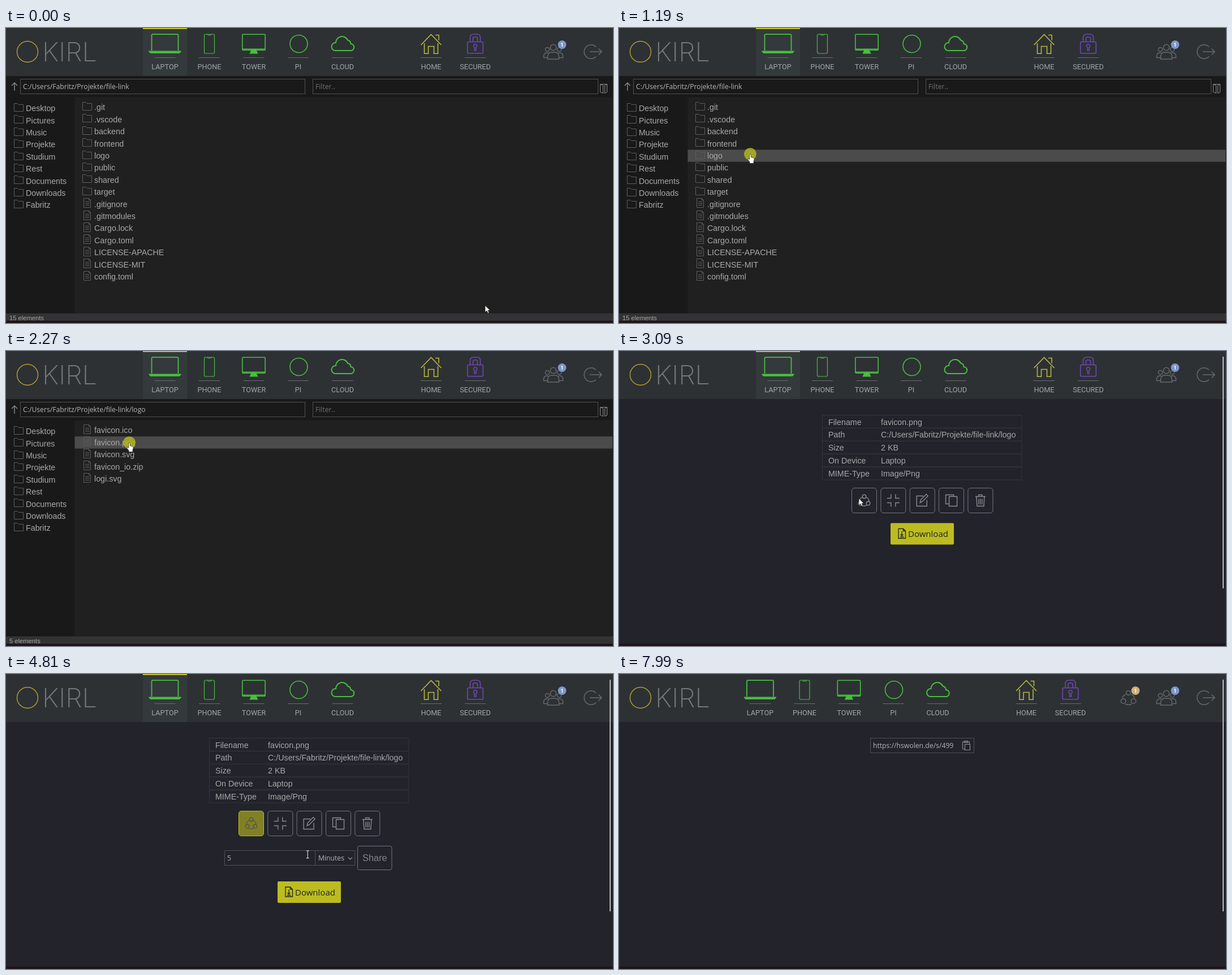
Recreate the animation shown at these times as an HTML page. Size 1073 by 522 pixels, loop 9110 ms.

```html
<!DOCTYPE html>
<html lang="en">
<head>
<meta charset="utf-8">
<title>File browser</title>
<style>
html, body { margin: 0; width: 100%; height: 100%; overflow: hidden; background: #22232b; }
svg { display: block; width: 1073px; height: 522px; }
.list { font: 14.25px "Liberation Sans", Arial, sans-serif; fill: #a8a8a8; }
.ui { font: 12.2px "Open Sans", "Noto Sans", sans-serif; fill: #b6b6b6; }
.nav { font: 12.7px Roboto, sans-serif; fill: #a3a6a8; text-anchor: middle; }
.badge { font: 600 9.5px Roboto, sans-serif; fill: #fff; text-anchor: middle; }
.brand { font: 200 47px Inter, sans-serif; fill: #74787b; }
.line { fill: none; stroke: #5d5d5d; }
.field { fill: none; stroke: #505052; }
.icon { fill: none; stroke: #8c8d91; stroke-width: 1.4; }
.head { fill: none; stroke: #65696c; stroke-width: 1.5; }
.mouse { fill: #fff; stroke: #222; stroke-width: .7; }
</style>
</head>
<body>
<script>
const LOOP = 9110, ROW = 21.4, YELLOW = '#bcbc20', GREEN = '#48bf3e';
const USER = 'Fabritz', HOME = `C:/Users/${USER}/Projekte/file-link`;
const places = ['Desktop', 'Pictures', 'Music', 'Projekte', 'Studium', 'Rest', 'Documents', 'Downloads', USER];
const rootFiles = ['.git', '.vscode', 'backend', 'frontend', 'logo', 'public', 'shared', 'target', '.gitignore',
  '.gitmodules', 'Cargo.lock', 'Cargo.toml', 'LICENSE-APACHE', 'LICENSE-MIT', 'config.toml'];
const logoFiles = ['favicon.ico', 'favicon.png', 'favicon.svg', 'favicon_io.zip', 'logi.svg'];

// Baselines sit on whole pixels
const text = (x, y, s, cls, more = '') => `<text x="${x}" y="${Math.round(y)}" class="${cls}" ${more}>${s}</text>`;
const rect = (x, y, w, h, more) => `<rect x="${x}" y="${y}" width="${w}" height="${h}" ${more}/>`;
const path = (d, more) => `<path d="${d}" ${more}/>`;
const ring = (x, y, r, more) => `<circle cx="${x}" cy="${y}" r="${r}" ${more}/>`;
const group = (id, body, more = '') => `<g id="${id}" ${more}>${body}</g>`;
const move = (x, y, body) => `<g transform="translate(${x} ${y})">${body}</g>`;

const folder = (x, y) => path(`M${x} ${y + 14}V${y}H${x + 5.5}L${x + 7.5} ${y + 2}H${x + 16}V${y + 14}Z`, 'class="line"');
const sheet = (x, y) => path(`M${x} ${y}H${x + 9}L${x + 12} ${y + 3}V${y + 16}H${x}ZM${x + 9} ${y}V${y + 3}H${x + 12}` +
  [6, 9, 12].map(d => `M${x + 2.5} ${y + d}h7.5`).join(''), 'class="line"');
const listing = (names, folders) => names.map((name, i) => {
  const y = Math.round(i * ROW) + .5;
  return (i < folders ? folder(135.5, 131 + y) : sheet(137.5, 130 + y)) + text(156, 145.4 + i * ROW, name, 'list');
}).join('');

const tab = (x, label, color, icon) => move(x, 0,
  `<g fill="none" stroke="${color}" stroke-width="1.6">${icon}</g>` +
  path('M-18.5 52.5H18.5', 'stroke="#696d70"') + text(0, 73, label, 'nav'));
const badge = (x, color) => ring(x, 29.5, 7.4, `fill="${color}"`) + text(x, 33, 1, 'badge');
const person = (x, y, r) => ring(x, y, r, 'class="head"');

const tabs =
  tab(281, 'LAPTOP', GREEN, path('M-23.5 40V13Q-23.5 11.2-21.5 11.2H21.5Q23.5 11.2 23.5 13V40', 'stroke-width="1.8"') +
    path('M-28.5 41H28.5L26 44.3H-26Z', `fill="${GREEN}" stroke-width="1"`)) +
  tab(359.5, 'PHONE', GREEN, rect(-9, 11, 18, 34, 'rx="2.5" stroke-width="1.2"') +
    path('M-4 11L-3 12.7H3L4 11', 'stroke-width="1"')) +
  tab(438, 'TOWER', GREEN, rect(-20.2, 11.2, 40.4, 28, 'rx="1.5"') +
    path('M-20 37.5H20M-3.5 39L-6 44.5H6L3.5 39Z', `fill="${GREEN}" stroke-width="2"`)) +
  tab(516.5, 'PI', GREEN, ring(1, 28, 15.5, '')) +
  tab(595, 'CLOUD', GREEN, path('M-13 40A7 7 0 0 1-12 26A11 11 0 0 1 9 21.5A7 7 0 0 1 14.5 28A6 6 0 0 1 14 40Z', 'stroke-width="2"')) +
  tab(751.5, 'HOME', '#bab73c', path('M-18 30L0 11.5L18 30M-12 27V45.2H-5V32.5H5V45.2H12V27M7.5 12.5H13.5V21.5')) +
  tab(829.5, 'SECURED', '#7047b2', rect(-13.8, 24.5, 27.6, 20.3, 'rx="2"') +
    path('M-9 24V17Q-9 11-3 11H3Q9 11 9 17V24M-4 24V18.5Q-4 16-2 16H2Q4 16 4 18.5V24') +
    path('M-1.3 40V34.4A3 3 0 1 1 1.3 34.4V40Z'));

const header =
  rect(0, 0, 1073, 85, 'fill="#2d3134"') +
  group('active', rect(242, 0, 78, 85, 'fill="#34393c"') + rect(242, 0, 78, 1.7, 'fill="#d8d826"')) +
  ring(38, 42, 18.5, 'fill="none" stroke="#b59b35" stroke-width="1.5"') +
  text(64, 59, 'KIRL', 'brand') +
  group('tabs', tabs) +
  group('shares', person(900.5, 33.5, 3.8) + person(891.5, 48, 4.3) + person(909.5, 48, 4.3) +
    path('M895.5 36Q890 39 890 42.5M905.5 36Q911 39 911 42.5M895 53Q900.5 56 906 53', 'class="head"') + badge(913, '#cfb07c')) +
  person(967.5, 34.5, 5.2) + person(957, 38, 3.6) + person(978, 38, 3.6) +
  path('M957.5 55V51Q958 43 964 43H971Q977 43 977.5 51V55ZM957 52.5H950.5V49Q951 44.5 955 44H958.5M978 52.5H984.5V49Q984 44.5 980 44H976.5', 'class="head"') +
  badge(983, '#7e97cb') +
  path('M1043 33.5A12.2 12.2 0 1 0 1043 50.5M1032 42H1053M1047.5 36.5L1053 42L1047.5 47.5', 'class="head"');

const files =
  rect(0, 85, 1073, 433, 'fill="#191919"') + rect(121.5, 122.5, 950.5, 383, 'fill="#202020"') +
  rect(0, 505, 1073, 13, 'fill="#333335"') + text(6, 517, '', 'list', 'id="count" style="font-size:11.2px"') +
  path('M15 111V97M10 102L15 97L20 102', 'class="icon"') +
  rect(25.5, 90.5, 503, 26, 'class="field"') + text(30, 108, '', 'ui', 'id="path"') +
  rect(542.5, 90.5, 504, 26, 'class="field"') + text(547, 108, 'Filter..', 'ui', 'style="fill:#707070"') +
  path('M1050.5 99.5L1055.5 101.5V115.5L1050.5 113.5ZM1050.5 99.5H1062.5L1058.5 101.5V115.5L1062.5 113.5V99.5', 'class="icon" style="stroke-width:1"') +
  places.map((name, i) => folder(14.5, Math.round(i * ROW) + 133.5) + text(35, 147.1 + i * ROW, name, 'list')).join('') +
  rect(121.5, 0, 950.5, ROW, 'id="hover" fill="#4b4b4b"') +
  group('root', listing(rootFiles, 8)) + group('logo', listing(logoFiles, 0));

const facts = [['Filename', 'favicon.png'], ['Path', HOME + '/logo'], ['Size', '2 KB'],
  ['On Device', 'Laptop'], ['MIME-Type', 'Image/Png']];
const tools = [
  ring(0, -7, 3.3, '') + ring(-7, 5, 3.3, '') + ring(7, 5, 3.3, '') +
    path('M-3.5-6Q-8.5-3-8.5 1.5M3.5-6Q8.5-3 8.5 1.5M-4.5 8.5Q0 11 4.5 8.5'),
  path('M-4-11V-4H-11M4-11V-4H11M-4 11V4H-11M4 11V4H11'),
  path('M2-8H-10V10H8V-1M-4 4L-3-1L7-11L10-8L0 2Z'),
  path('M-4-7H10V10H-4ZM-4 6H-10V-10H4V-7'),
  path('M-9-7H9M-3-7V-10H3V-7M-7-7L-6 10H6L7-7M-3-3V7M0-3V7M3-3V7')
];
const details =
  facts.map(([key, value], i) => rect(359.5, 113.5 + i * 22.9, 352.5, 22.9, 'fill="none" stroke="#34353d"') +
    text(370, 130.6 + i * 22.85, key, 'list') + text(463, 130.6 + i * 22.85, value, 'list')).join('') +
  tools.map((icon, i) => {
    const x = 411.5 + i * 51.35;
    return rect(x, 242.5, 44, 44, `rx="4.5" id="tool${i}" fill="${YELLOW}" fill-opacity="0" stroke="#77787d"`) +
      move(x + 22, 264.5, `<g class="icon" id="icon${i}">${icon}</g>`);
  }).join('') +
  group('form', rect(386.5, 312.5, 160, 26, 'class="field"') + text(391, 330, '5', 'ui') +
    rect(546.5, 312.5, 70, 26, 'class="field"') + text(552, 330, 'Minutes', 'ui') +
    path('M605 324.5L608.5 328L612 324.5', 'class="icon"') +
    rect(621.5, 304.5, 60.5, 42, `rx="3" id="send" fill="${YELLOW}" fill-opacity="0" stroke="#77787d"`) +
    text(630, 331, 'Share', 'list', 'id="sendText" style="font-size:16.4px;fill:#83848a"')) +
  group('download', rect(480, 304.5, 112, 38, `rx="2" fill="${YELLOW}"`) +
    path('M494 314.5H502.5L506.5 318.5V331.5H494ZM502.5 314.5V318.5H506.5M500 319V327M497.5 324.5L500 327L502.5 324.5M497 329H503.5', 'fill="none" stroke="#22232b" stroke-width="1.3"') +
    text(511, 329, 'Download', 'ui', 'style="font-size:15px;fill:#22232b"'));

const link =
  rect(444.5, 113.5, 183, 26, 'class="field"') +
  text(449, 131, 'https://hswolen.de/s/499', 'ui') +
  path('M611 133H607.5V120H619.5V124M610.5 121.5V118.5H616.5V121.5ZM611.5 124.5H620.5V134.5H611.5Z', 'class="icon" style="stroke-width:1.2"');

document.body.innerHTML = '<svg viewBox="0 0 1073 522">' +
  rect(0, 0, 1073, 522, 'fill="#22232b"') + header +
  group('files', files) + group('details', details) + group('link', link) +
  rect(0, 518, 1073, 4, 'fill="#1f1419"') +
  rect(1067, 10, 2, 410, 'id="bar" fill="#bcbcc0"') +
  group('mouse', ring(0, 0, 10.8, 'id="press" stroke="none" fill="#b4b41e" fill-opacity=".85"') +
    path('M0 0V12L2.9 9.3L4.9 13.6L6.8 12.7L5 8.6H8.5Z', 'id="arrow"') +
    path('M-1.3 1Q0-.8 1.3 1V5.5L5.8 6.8Q7.2 7.3 7 9.5L6 13.5V16.5H-1V14L-4.3 10Q-4.4 8-2.7 8.4L-1.3 9.7Z', 'id="hand"') +
    path('M-2.5-6.5H-.7L0-6L.7-6.5H2.5M-2.5 6.5H-.7L0 6L.7 6.5H2.5M0-6V6', 'id="beam" style="fill:none;stroke:#ddd;stroke-width:1.1"'), 'class="mouse"') +
  '</svg>';

const el = id => document.getElementById(id);
const show = (id, on) => { el(id).style.display = on ? '' : 'none'; };
const attr = (id, name, value) => el(id).setAttribute(name, value);
const ramp = (t, from, to) => Math.min(1, Math.max(0, (t - from) / (to - from)));
const within = (t, from, to) => t >= from && t < to;

// time, x, y, 1 = slow down on arrival
const route = [[70, 847, 491], [490, 364, 303], [960, 232, 223, 1], [1850, 232, 223], [2200, 218, 162, 1],
  [2540, 218, 162], [3090, 424, 261], [3440, 433, 264, 1], [4530, 433, 264], [4810, 533, 319],
  [5080, 610, 342], [5360, 666, 331, 1], [7580, 666, 331], [7920, 896, 491], [7990, 941, 523]];
function pointer(t) {
  const i = route.findIndex(p => p[0] > t);
  if (i < 1) return (i ? route.at(-1) : route[0]).slice(1, 3);
  const [t0, x0, y0] = route[i - 1], [t1, x1, y1, slow] = route[i];
  let k = ramp(t, t0, t1);
  if (slow) k *= 2 - k;
  return [x0 + (x1 - x0) * k, y0 + (y1 - y0) * k];
}

const pages = [[1390, 'root'], [1520, 'blank'], [2400, 'logo'], [2540, 'blank'], [5760, 'details'], [5900, 'blank'], [LOOP, 'link']];
const clicks = [[1120, 1320], [2270, 2400], [3650, 3780], [5360, 5560]];

function render(t) {
  const page = pages.find(p => t < p[0])[1];
  const [x, y] = pointer(t);
  const over = (left, top, right, bottom) => x >= left && x <= right && y >= top && y <= bottom;
  const inFiles = page === 'root' || page === 'logo';
  let shape = 'arrow';

  show('files', inFiles);
  show('details', page === 'details');
  show('link', page === 'link');
  show('bar', page === 'details' || page === 'link');
  attr('active', 'opacity', 1 - ramp(t, 5760, 6160));

  if (inFiles) {
    const names = page === 'root' ? rootFiles : logoFiles;
    const row = Math.floor((y - 129.8) / ROW), hit = x > 122 && row >= 0 && row < names.length;
    show('root', page === 'root');
    show('logo', page === 'logo');
    show('hover', hit);
    attr('hover', 'y', 129.8 + row * ROW);
    el('path').textContent = HOME + (page === 'logo' ? '/logo' : '');
    el('count').textContent = names.length + ' elements';
    if (hit) shape = 'hand';
  }

  if (page === 'details') {
    const open = t >= 3850;
    const fill = ramp(t, 3160, 3510) - .38 * ramp(t, 4600, 4810), send = ramp(t, 5220, 5430);
    attr('tool0', 'fill-opacity', fill);
    attr('tool0', 'stroke', fill ? YELLOW : '#77787d');
    el('icon0').style.stroke = fill ? '#55564f' : '';
    show('form', open);
    attr('form', 'opacity', ramp(t, 3780, 4260));
    attr('send', 'fill-opacity', send);
    el('sendText').style.fill = send > .5 ? '#22232b' : '#83848a';
    attr('download', 'transform', `translate(0 ${open ? 62.5 : 0})`);
    if (t > 3160 && over(411, 242, 456, 287) || open && over(621, 304, 682, 347)) shape = 'hand';
    else if (open && over(386, 312, 547, 339)) shape = 'beam';
  }

  const shared = t >= 7580;
  attr('tabs', 'transform', `translate(${shared ? -31.5 : 0} 0)`);
  show('shares', shared);

  attr('mouse', 'transform', `translate(${x} ${y})`);
  show('mouse', t < 7990);
  show('press', clicks.some(c => within(t, ...c)));
  for (const s of ['arrow', 'hand', 'beam']) show(s, s === shape);
}

const start = performance.now();
function tick() {
  render((performance.now() - start) % LOOP);
  requestAnimationFrame(tick);
}
tick();
</script>
</body>
</html>
```
